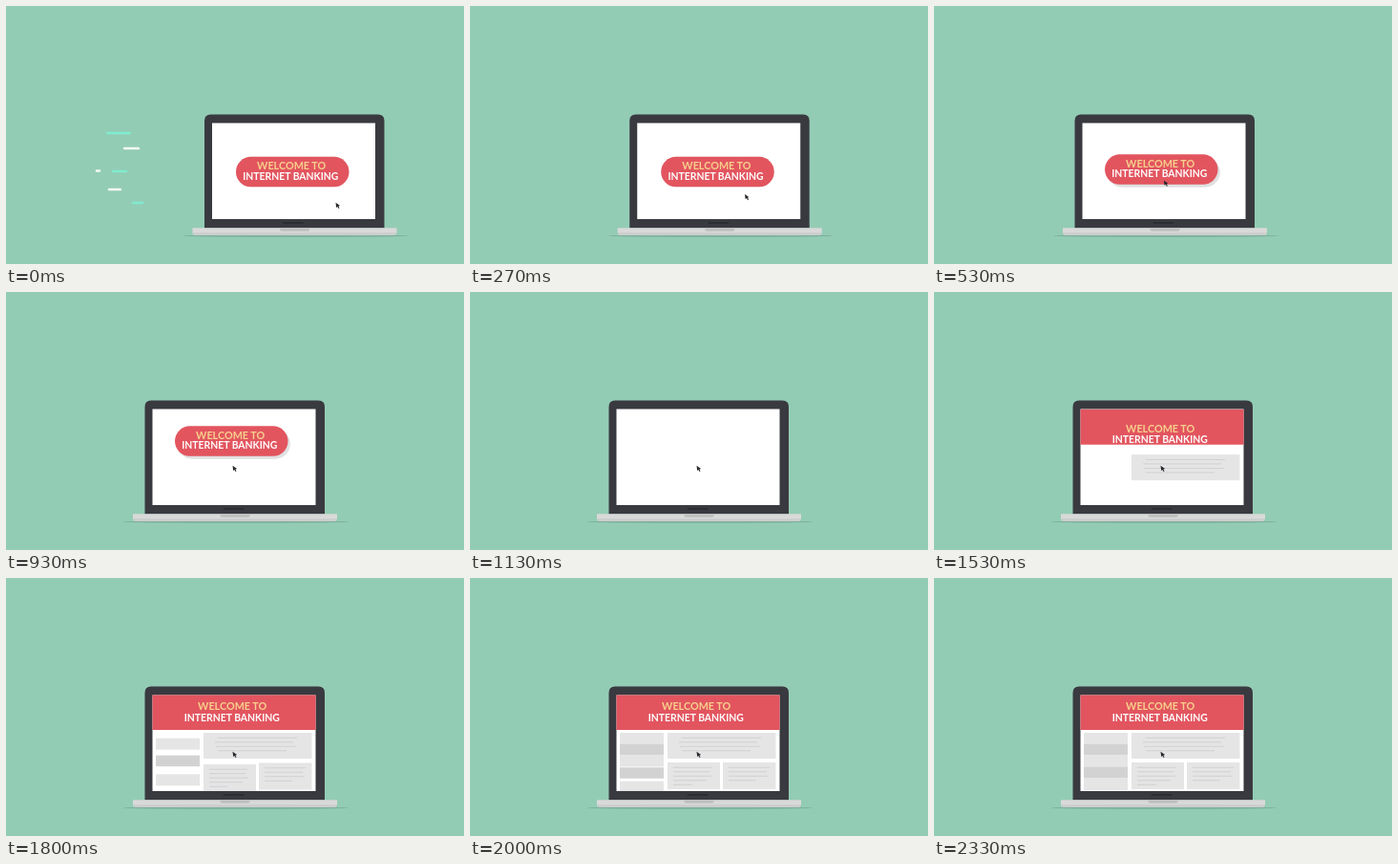
An HTML page for the animation above (2.74 s loop, 480 by 270 pixels).

```html
<!DOCTYPE html>
<html lang="en">
<head>
<meta charset="utf-8">
<title>Internet banking</title>
<style>
  html, body { margin: 0; width: 100%; height: 100%; overflow: hidden; background: #93ccb5; }
  svg { display: block; width: 100%; height: 100%; }
  text { font: 700 10.4px Lato, sans-serif; text-anchor: middle; fill: #fff; }
  .cream { font-size: 10.8px; fill: #f7cf8c; }
  .red { fill: #e2555f; }
</style>
</head>
<body>
<svg viewBox="0 0 480 270">
  <rect width="480" height="270" fill="#93ccb5"/>
  <g id="streaks" stroke-width="2.4" stroke-linecap="round"></g>
  <g id="laptop">
    <ellipse cx="241" cy="240.5" rx="118.5" ry="1.3" fill="#7cb09c"/>
    <path d="M145.5 232.5V120q0-6.5 6.5-6.5H327.5q6.5 0 6.5 6.5V232.5z" fill="#393a40"/>
    <rect x="227.5" y="226.2" width="22" height="1.6" rx="0.8" fill="#2a2b2f"/>
    <path d="M133 232.3H347V237q0 3-4 3H137q-4 0-4-3z" fill="#d9d9d9"/>
    <path d="M133 237.3H347q-.3 2.7-4 2.7H137q-3.7 0-4-2.7z" fill="#cbcdcc"/>
    <path d="M224.5 232.3H255.5v1.5q0 2-2 2H226.5q-2 0-2-2z" fill="#bfc0c0"/>
    <clipPath id="view"><rect x="153.5" y="122.5" width="171" height="100.5"/></clipPath>
    <g clip-path="url(#view)">
      <rect x="153" y="122" width="173" height="102" fill="#fff"/>
      <g id="button">
        <rect id="shade" x="178.5" y="157.8" width="118.5" height="31.5" rx="15.75" fill="#e0e0e0"/>
        <rect class="red" x="178.5" y="157.8" width="118.5" height="31.5" rx="15.75"/>
        <text class="cream" x="236.7" y="171.2">WELCOME TO</text>
        <text x="235.8" y="181.7">INTERNET BANKING</text>
      </g>
      <g id="page"></g>
      <path id="cursor" d="M0 0L4.6 3.2 2.9 3.6 4 5.7 3 6.2 2 4.1 .7 5.2z" fill="#26272b"/>
    </g>
  </g>
</svg>
<script>
const LOOP = 2740, STEP = 200 / 3;
const NS = "http://www.w3.org/2000/svg";
const $ = id => document.getElementById(id);
const clamp = v => Math.min(1, Math.max(0, v));
const move = (el, x, y) => el.setAttribute("transform", `translate(${x.toFixed(2)} ${y.toFixed(2)})`);

function add(parent, tag, attrs, label) {
  const el = document.createElementNS(NS, tag);
  for (const key in attrs) el.setAttribute(key, attrs[key]);
  if (label) el.textContent = label;
  return parent.appendChild(el);
}

// Page parts slide up from below the screen, each with its own start time.
const parts = [];
function part(start) {
  const el = add($("page"), "g", {});
  parts.push({ el, start });
  return el;
}

function panel(start, x, y, width, height, lines) {
  const g = part(start);
  add(g, "rect", { x, y, width, height, fill: "#e5e5e6" });
  lines.forEach(([from, to], i) =>
    add(g, "path", { d: `M${from} ${y + 5.3 + i * 4.5}H${to}`, stroke: "#d1d1d2", "stroke-width": 1 }));
}

const rowTops = [162, 174, 185.5, 197.5, 209, 222];
rowTops.slice(0, 5).forEach((y, i) =>
  add(part(1463 + 45 * i), "rect", {
    x: 157, y, width: 46, height: rowTops[i + 1] - y, fill: i % 2 ? "#d2d2d3" : "#e5e5e6"
  }));

panel(1420, 207, 193, 55, 28, [[213, 253], [213, 251], [213, 254], [213, 248], [213, 233]]);
panel(1390, 265, 193, 55.5, 28, [[271, 314], [271, 311], [271, 313], [271, 300]]);
panel(1217, 207, 162, 113.5, 27, [[222, 305], [219, 301], [220, 304], [222, 294]]);

add(part(1130), "rect", { class: "red", x: 153, y: 122, width: 173, height: 37 });
const title = part(1217);
add(title, "text", { class: "cream", x: 237.2, y: 138.4 }, "WELCOME TO");
add(title, "text", { x: 236.8, y: 149.6 }, "INTERNET BANKING");

const mint = "#80ecce", pale = "#f3faf3";
const streaks = [
  [106, 130, 133, mint], [124, 139, 149, pale], [95, 98, 172.5, pale],
  [112, 126, 173, mint], [108, 120, 192, pale], [133, 143, 206, mint]
].map(([x1, x2, y, stroke]) => ({ x1, x2, el: add($("streaks"), "line", { y1: y, y2: y, stroke }) }));

function draw(t) {
  move($("laptop"), 62.5 * (1 - clamp(t / 650)) ** 2, 0);

  const fade = clamp(t / 200);
  $("streaks").style.display = fade < 1 ? "" : "none";
  for (const { x1, x2, el } of streaks) {
    const left = x1 - 26 * fade;
    el.setAttribute("x1", left);
    el.setAttribute("x2", left + (x2 - x1) * (1 - fade));
  }

  const lift = clamp((t - 400) / 110);
  const rise = 14.5 * (Math.max(0, t - 560) / 370) ** 3.6;
  move($("button"), -1.5 * lift, -2.5 * lift - Math.min(rise, 120));
  move($("shade"), 2.3 * lift, 2.9 * lift);

  const reach = 1 - clamp(t / 545) ** 1.4;
  move($("cursor"), 237.5 + 45.5 * reach, 181.8 + 24 * reach);

  for (const { el, start } of parts) move(el, 0, 103 * (1 - clamp((t - start) / 440)) ** 2);
}

// The picture advances 15 times a second, on times rounded to 10 ms.
function tick(now) {
  const t = now % LOOP;
  let n = Math.floor((t + 4) / STEP);
  if (Math.round(n * STEP / 10) * 10 > t) n--;
  draw(Math.min(35, Math.max(0, n)) * STEP);
}

const begin = performance.now();
function loop() {
  tick(performance.now() - begin);
  requestAnimationFrame(loop);
}
loop();
</script>
</body>
</html>
```
